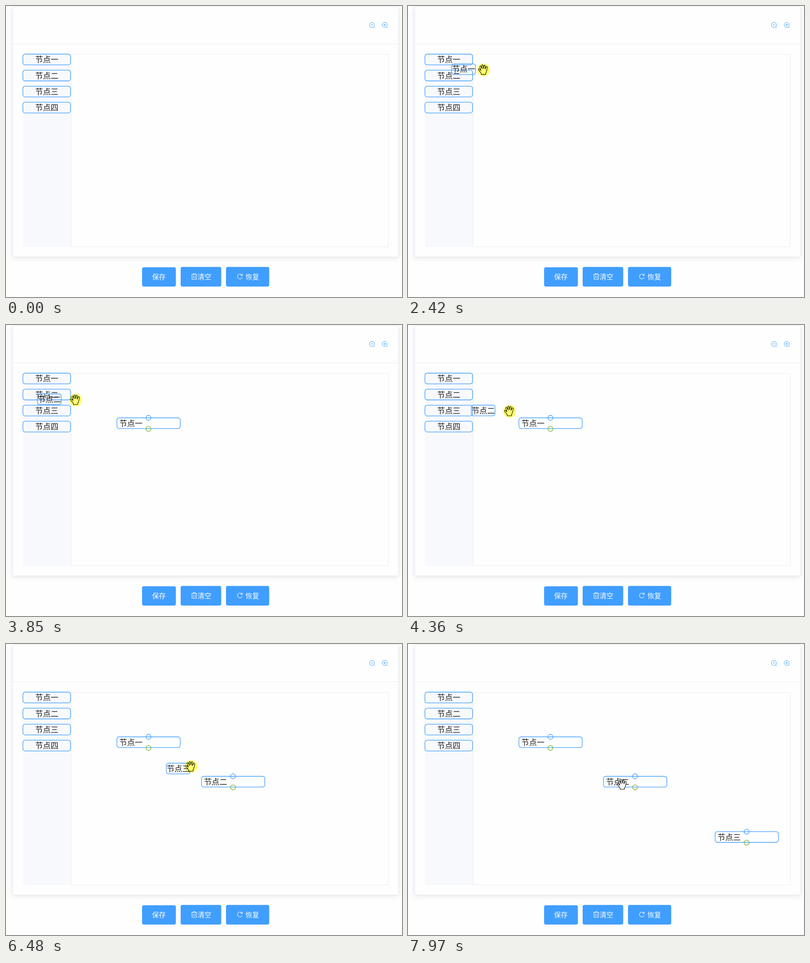
Write an HTML page that moves like this. It is 873x641 px and loops after 8 s.

```html
<!DOCTYPE html>
<html lang="zh">
<head>
<meta charset="utf-8">
<style>
  html, body { margin: 0; width: 100%; height: 100%; overflow: hidden; background: #fefefe; }
  svg { display: block; }
  text { font: 350 17px "Noto Sans CJK SC", "Noto Sans CJK", sans-serif; fill: #1c1c1c; }
  .card { fill: #fefefe; stroke: #ebeef5; filter: drop-shadow(0 2px 6px rgba(0, 0, 0, .1)); }
  .rule { fill: none; stroke: #ebebeb; }
  .blue { fill: none; stroke: #409eff; stroke-width: 1.3; }
  .green { fill: none; stroke: #7ab02c; stroke-width: 1.3; }
  .button rect { fill: #409eff; }
  .button text { fill: #fff; font-size: 15px; }
  .button path { fill: none; stroke: #fff; stroke-width: 1.1; }
  .zoom { fill: none; stroke: #409eff; stroke-width: 1; }
  .cursor path { fill: #fff; stroke: #000; stroke-width: 1.1; stroke-linejoin: round; }
  #press { fill: #ffff70; mix-blend-mode: multiply; }
</style>
</head>
<body>
<svg id="stage" width="873" height="641" viewBox="0 0 873 641"></svg>
<script>
const LOOP = 8000;
const NAMES = ['节点一', '节点二', '节点三', '节点四'];

// Cursor keyframes: time, x, y
const PATH = [
  [650, 609, 628], [790, 350, 525], [900, 247, 487], [1000, 185, 410], [1150, 150, 300],
  [1430, 102, 147], [1510, 102, 147], [1970, 107, 121], [2220, 107, 118], [2910, 309, 193],
  [3119, 309, 193], [3120, 303, 190], [3230, 303, 190], [3450, 121, 165], [3619, 121, 165],
  [3620, 121, 153], [4360, 223, 189], [4470, 223, 189], [4820, 475, 277], [5020, 475, 277],
  [5080, 494, 279], [5380, 494, 279], [5950, 91, 184], [6180, 91, 183], [6480, 407, 269],
  [6590, 407, 269], [6900, 677, 390], [7120, 677, 390], [7450, 742, 405], [7610, 742, 405],
  [7970, 472, 309]
];

// Each drag leaves a node at (x, y); dx, dy is the grab offset
const DRAGS = [
  { start: 2220, end: 3120, dx: -70, dy: -13, x: 244.5, y: 204.5 },
  { start: 3620, end: 5310, dx: -84, dy: -13, x: 431, y: 291.5 },
  { start: 6180, end: 7610, dx: -54, dy: -7, x: 677, y: 413.3 }
];

const box = (x, y, w, cls = 'blue') =>
  `<rect x="${x}" y="${y}" width="${w}" height="23.7" rx="5" class="${cls}"/>`;
const label = (x, y, s, extra = '') => `<text x="${x}" y="${y}" ${extra}>${s}</text>`;
const dot = (x, y, cls) => `<circle cx="${x}" cy="${y}" r="5.5" class="${cls}"/>`;

const item = (name, i) => {
  const y = 106 + i * 35.3;
  return box(37.3, y, 105) + label(90, y + 18.4, name, 'text-anchor="middle"');
};
const node = (d, i) => `<g id="node${i}">${box(d.x, d.y, 139.6)}${label(d.x + 5.5, d.y + 18.4, NAMES[i])}
  ${dot(d.x + 69.5, d.y, 'blue')}${dot(d.x + 69.5, d.y + 24.3, 'green')}</g>`;
const button = (x, y, w, textX, s, icon = '') => `<g class="button">
  <rect x="${x}" y="${y}" width="${w}" height="${618 - y}" rx="4"/>${label(textX, 602, s)}<path d="${icon}"/></g>`;
const zoom = (x, sign) => `<path class="zoom" transform="translate(${x} 42)"
  d="M5.3 -.3A5.5 5.5 0 1 1 -5.7 -.3A5.5 5.5 0 1 1 5.3 -.3M3.8 3.8L6.3 6.3${sign}"/>`;

const TRASH = 'M408.5 591.5H421.5M412.5 591V589.5H417.5V591M410 591.5V602H420V591.5M413.3 594.5V599.5M416.7 594.5V599.5';
const RELOAD = 'M520.2 593.2A5.3 5.3 0 1 0 520.8 597M520.8 589.8V593.5H517';
const HAND = `M-4 11C-4 7 -9 3 -10.5 .5C-11 -1.5 -8.5 -1.8 -7.5 -.5L-5 2L-7.5 -5.5C-8 -8 -5.2 -8.5 -4.6 -6.5
  L-2.6 -1.5L-3.2 -8.5C-3.2 -10.8 -.5 -10.8 -.2 -8.5L.6 -2L1.6 -8.2C2 -10.2 4.6 -9.8 4.4 -7.5L4 -1
  L6.2 -5.5C7.2 -7.3 9.8 -6.2 9 -4C8 0 8 4 6 7L5 11Z`;
const MOVE = `M0 -13.5L5 -8H2V-2H8V-5L13.5 0L8 5V2H2V8H5L0 13.5L-5 8H-2V2H-8V5L-13.5 0L-8 -5V-2H-2V-8H-5Z`;
const ARROW = 'M0 0V16L4 12.5L6.5 18L9 17L6.5 11.5H11.5Z';

const stage = document.getElementById('stage');
stage.innerHTML = `
  <rect class="card" x="15" y="1.5" width="850" height="551" rx="3"/>
  <path class="rule" d="M15 83.5H865"/>
  ${zoom(807, 'M-2.8 -.3H2.4')}${zoom(835, 'M-2.8 -.3H2.4M-.2 -2.9V2.3')}
  <rect x="37" y="106" width="106" height="425" fill="#f8f9fc"/>
  <rect class="rule" x="143.5" y="106.5" width="699.5" height="424"/>
  ${NAMES.map(item).join('')}
  ${button(300, 575.5, 74.5, 322, '保存')}
  ${button(385, 574.7, 89.5, 422.5, '清空', TRASH)}
  ${button(485, 574.7, 95.3, 528, '恢复', RELOAD)}
  ${DRAGS.map(node).join('')}
  <g id="clone">${box(0.5, 0.5, 52.3)}${label(1.5, 18.6, '')}</g>
  <g id="cursor" class="cursor"><path/></g>
  <circle id="press" r="14"/>`;

const get = id => document.getElementById(id);
const clone = get('clone'), cursor = get('cursor'), press = get('press');
const cloneText = clone.querySelector('text'), cursorShape = cursor.querySelector('path');
const nodes = DRAGS.map((_, i) => get('node' + i));
const show = (el, on) => el.style.display = on ? '' : 'none';
const place = (el, x, y) => el.setAttribute('transform', `translate(${x} ${y})`);

function cursorAt(t) {
  const i = PATH.findIndex(k => k[0] > t);
  if (i < 0) return PATH[PATH.length - 1].slice(1);
  if (i === 0) return PATH[0].slice(1);
  const [t0, x0, y0] = PATH[i - 1], [t1, x1, y1] = PATH[i];
  const p = (t - t0) / (t1 - t0);
  return [x0 + (x1 - x0) * p, y0 + (y1 - y0) * p];
}

function draw(t) {
  const [x, y] = cursorAt(t);
  const active = DRAGS.findIndex(d => t >= d.start && t < d.end);
  const drag = DRAGS[active];

  DRAGS.forEach((d, i) => show(nodes[i], t >= d.end));
  show(cursor, t >= PATH[0][0]);
  show(clone, drag);
  show(press, drag);

  cursorShape.setAttribute('d', y > 530 ? ARROW : x > 143 ? HAND : MOVE);
  place(cursor, x, y);
  if (drag) {
    cloneText.textContent = NAMES[active];
    place(clone, x + drag.dx, y + drag.dy);
    place(press, x + 1, y + 1);
  }
}

const origin = performance.now();
function tick() {
  draw((performance.now() - origin) % LOOP);
  requestAnimationFrame(tick);
}
tick();
</script>
</body>
</html>
```
